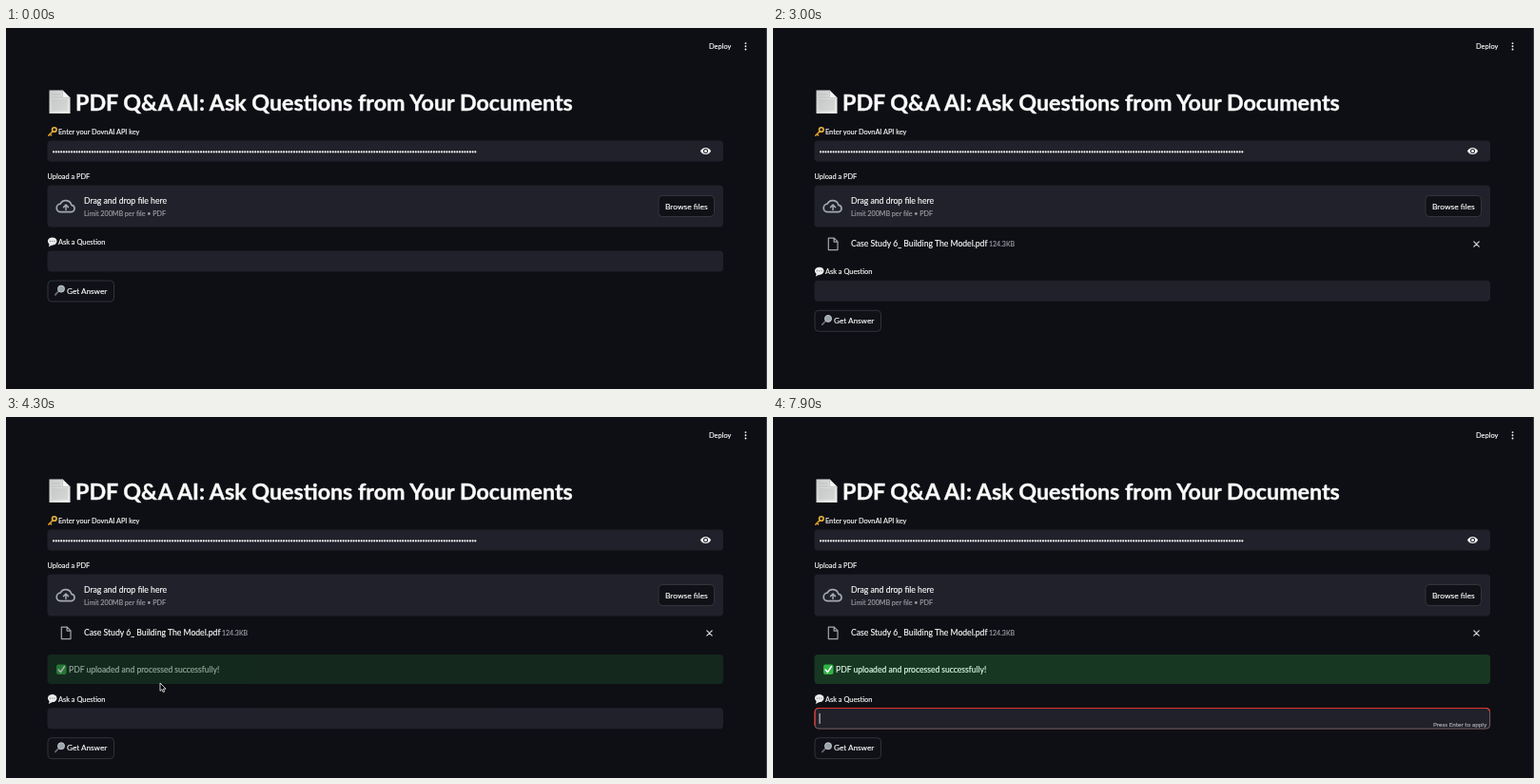
An HTML page that plays this animation: 800x380 px, repeating every 8000 ms.

```html
<!DOCTYPE html>
<html lang="en">
<head>
<meta charset="utf-8">
<title>PDF Q&amp;A</title>
<style>
  html, body { margin: 0; width: 100%; height: 100%; overflow: hidden; background: #0e0f14; }
  svg { display: block; width: 800px; height: 380px; }
  text { white-space: pre; }
  .app { font-family: Lato, "Open Sans", sans-serif; stroke-width: .16px; }
  .mac { font-family: Inter, Roboto, sans-serif; font-weight: 500; }
  .doc { font-family: "Liberation Sans", Arial, sans-serif; }
</style>
</head>
<body>
<svg id="stage" viewBox="0 0 800 380" xmlns="http://www.w3.org/2000/svg"></svg>
<script>
const LOOP = 8000;
const WHITE = '#fafafa', PANEL = '#20212a', BG = '#0e0f14', GREY = '#9a9ca4';
const esc = s => s.replace(/&/g, '&amp;').replace(/</g, '&lt;');

const text = (x, y, s, size, fill, cls, extra = '') =>
  `<text x="${x}" y="${y}" font-size="${size}" fill="${fill}" class="${cls}" ${extra}>${esc(s)}</text>`;
const app = (x, y, s, size, fill = WHITE, extra = '') =>
  text(x, y, s, size, fill, 'app', `stroke="${fill}" ${extra}`);
const mac = (x, y, s, size = 7, fill = '#e8e8e8', extra = '') => text(x, y, s, size, fill, 'mac', extra);
const rect = (x, y, w, h, fill, r = 0, extra = '') =>
  `<rect x="${x}" y="${y}" width="${w}" height="${h}" rx="${r}" fill="${fill}" ${extra}/>`;
const line = (d, stroke, w = 1, extra = '') =>
  `<path d="${d}" fill="none" stroke="${stroke}" stroke-width="${w}" stroke-linecap="round" stroke-linejoin="round" ${extra}/>`;
const shape = (d, fill, extra = '') => `<path d="${d}" fill="${fill}" ${extra}/>`;
const dot = (x, y, r, fill, extra = '') => `<circle cx="${x}" cy="${y}" r="${r}" fill="${fill}" ${extra}/>`;
const group = (id, body, extra = '') => `<g id="${id}" ${extra}>${body}</g>`;

function pageIcon() {
  let rows = '';
  for (let y = 76; y < 88; y += 2) rows += `M48.5 ${y}H64.5`;
  return shape('M45.5 65.5H59.5L67.5 73.5V90H45.5Z', 'url(#paper)') +
    line('M48.5 70H57M48.5 73H58' + rows, '#aeb0b0', .6) +
    shape('M59.5 65.5V73.5H67.5Z', '#f4f4f4', 'stroke="#9b9b9b" stroke-width=".4"');
}

const keyIcon = () =>
  line('M49.3 108.6L44.8 113.1M46.3 111.6L47.6 112.9', '#d99a2b', 1.5) +
  dot(50.8, 107, 2.3, 'none', 'stroke="#e8b23c" stroke-width="1.6"');

const bubbleIcon = () =>
  `<ellipse cx="48.7" cy="224.4" rx="4.8" ry="4" fill="#ececec"/>` +
  shape('M46 226.5L44.8 230.2L49.5 228Z', '#ececec') +
  [46.4, 48.7, 51].map(x => dot(x, 224.4, .6, '#77787c')).join('');

const lensIcon = () =>
  line('M55.2 277.2L51.8 280.8', '#6b6d72', 1.7) +
  dot(58, 274.6, 3.5, '#9aa6ad', 'stroke="#c3c6c9" stroke-width="1"');

const eyeIcon = () =>
  shape('M730 129.5C732 124.7 739 124.7 741 129.5C739 134.3 732 134.3 730 129.5Z', WHITE) +
  dot(735.5, 129.5, 2.5, PANEL) + dot(735.5, 129.5, 1.5, WHITE);

const cloudIcon = () =>
  line('M57.6 193.6A4.2 4.2 0 0 1 57.2 185.2A6.2 6.2 0 0 1 68.8 186.3A3.7 3.7 0 0 1 69 193.6Z', '#a3a8b4', 1.7) +
  line('M63 191.4V186.6M60.5 188.6L63 186.1L65.5 188.6', '#a3a8b4', 1.5);

function page() {
  const header = app(739, 22.1, 'Deploy', 7.45) +
    [16.1, 19.3, 22.5].map(y => dot(777.5, y, .95, WHITE)).join('') +
    pageIcon() +
    app(73, 87, 'PDF Q&A AI: Ask Questions from Your Documents', 23.25, WHITE, 'font-weight="700" style="stroke-width:.4px"');

  const key = keyIcon() + app(55, 111.8, 'Enter your DovnAI API key', 7.3) +
    rect(43.5, 118.5, 710.5, 22, PANEL, 4) +
    line('M50 130.4H495', WHITE, 2.1, 'stroke-dasharray="0 2.72"') + eyeIcon();

  const upload = app(43.5, 159.1, 'Upload a PDF', 7.35) +
    rect(43.5, 165.5, 710.5, 44, PANEL, 4) + cloudIcon() +
    app(82, 184.5, 'Drag and drop file here', 8.65) +
    app(82, 198, 'Limit 200MB per file • PDF', 7.15, GREY) +
    rect(686, 176.5, 58.5, 22, '#101117', 4, 'stroke="#3c3d44" stroke-width=".8"') +
    app(715.3, 190.6, 'Browse files', 8.45, WHITE, 'text-anchor="middle"');

  const file = line('M58.3 221.2H64.3L68 224.9V233.6H58.3Z M64.1 221.4V225.1H67.8', '#a3a5ab', 1.2) +
    app(82, 229.9, 'Case Study 6_ Building The Model.pdf', 8.64) +
    app(227, 229.9, '124.3KB', 7, GREY) +
    line('M736.8 224.8L742.2 230.2M742.2 224.8L736.8 230.2', '#e4e4e6', 1.1);

  const success = rect(43.5, 250, 710.5, 31, '#183722', 4) +
    rect(53, 260.5, 10.5, 10.5, '#2fb344', 2) + line('M55.2 266L57.4 268.6L61.4 262.6', '#fff', 1.6) +
    app(66, 269, 'PDF uploaded and processed successfully!', 8.56, '#dffde9');

  const ask = bubbleIcon() + app(55, 228, 'Ask a Question', 7.4) +
    rect(43.5, 234.5, 710.5, 22, PANEL, 4) +
    group('focus',
      rect(44, 234.8, 709.6, 21.6, 'none', 4, 'stroke="#85676c" stroke-width=".9"') +
      line('M44 252.5V238.8A4 4 0 0 1 48 234.8H749.6A4 4 0 0 1 753.4 237.5', '#e3342f', 1.2)) +
    group('caret', rect(48.6, 240.2, .9, 11, WHITE)) +
    group('hint', app(694, 253.9, 'Press Enter to apply', 6.45, '#a9abb1')) +
    rect(44, 266, 69.5, 22, '#101117', 4, 'stroke="#3c3d44" stroke-width=".8"') +
    lensIcon() + app(64, 279.8, 'Get Answer', 8.2);

  return header + key + upload + group('file', file) + group('success', success) + group('ask', ask);
}

const folder = (x, y) =>
  shape(`M${x} ${y - 3.2}h3l1 1h4v5.6h-8z`, '#3fa9e6') + rect(x, y - 1.2, 8, 4.6, '#5cc0f5', .5);
const chevron = (x, y, c = '#8a8a8d') => line(`M${x} ${y - 1.7}l1.7 1.7l-1.7 1.7`, c, .8);
const sheetIcon = (x, y, c) =>
  shape(`M${x + .8} ${y - 4}h4.2l2 2v6h-6.2z`, c) + line(`M${x + 2.2} ${y}h3.2M${x + 2.2} ${y + 2}h3.2`, '#55585e', .5);

// kind: d = folder, p = selectable document, x = disabled
const FILES = [
  ['d', '__pycache__'], ['x', '1.ipynb'], ['x', 'ai_chatbot.jpg'], ['x', 'answers_hw1.txt'],
  ['x', 'beer_50000.json'], ['x', 'RemZut Web'], ['p', 'Case Study 6…The Model.pdf'],
  ['d', 'Cover Letters'], ['d', 'DSC_206'], ['p', 'dummy_sum…zation_test.pdf'],
  ['x', 'Filtering Asia…May 2024.twb'], ['d', 'Doltun Portfolio']
];

function fileRows() {
  return FILES.map(([kind, name], i) => {
    const y = 241.7 + i * 12.34;
    const icon = kind === 'd' ? folder(265, y) + chevron(381, y)
      : i === 5 ? rect(265.5, y - 3.5, 7, 7, '#68686a', 1)
      : sheetIcon(265, y, kind === 'p' ? '#eeeeee' : '#66666a');
    return icon + mac(276, y + 2.5, name, 7, kind === 'x' ? '#666669' : '#ececec');
  }).join('');
}

function sidebar() {
  const head = (y, s) => mac(184, y + 2.3, s, 6.4, '#77777b', 'font-weight="600"');
  const item = (y, s) => mac(197, y + 2.5, s);
  const tags = [['Red', '#ff5a52'], ['Orange', '#f7a13a'], ['Yellow', '#f8d64a'], ['Green', '#4fd063']];
  return head(210.3, 'Favorites') + head(228.4, 'Vilnod') + head(277.6, 'Locations') + head(311, 'Tags') +
    dot(189, 241.2, 3.6, '#2f7df6') + item(241.2, 'Vilnod Dr…') +
    dot(241, 241, 3.9, 'none', 'stroke="#8a8a8d" stroke-width=".7"') + line('M241 237.3V241', '#8a8a8d', .8) +
    line('M185 255V260.5H193.5V255H188.5L187.5 254H185Z', '#2f7df6', 1) + dot(189.3, 257.7, 1.2, '#2f7df6') +
    item(257, 'Shared') +
    dot(189.3, 290.6, 3.5, 'none', 'stroke="#a8a8ab" stroke-width=".8"') +
    line('M186 290.6H192.6M189.3 287.2C187.2 289 187.2 292.2 189.3 294C191.4 292.2 191.4 289 189.3 287.2', '#a8a8ab', .6) +
    item(290.6, 'Network') +
    tags.map(([s, c], i) => dot(189.2, 324.2 + i * 15.65, 2.9, c) + item(324.2 + i * 15.65, s)).join('');
}

function toolbar() {
  const down = x => line(`M${x} 213.8l1.8 1.8l1.8 -1.8`, '#c9c9cb', .9);
  let grid = '';
  for (let i = 0; i < 9; i++) grid += rect(333.3 + i % 3 * 2.8, 210.7 + Math.floor(i / 3) * 2.8, 2, 2, '#c9c9cb');
  return rect(267, 209, 12.4, 11.5, '#414144', 2.5) + rect(280.4, 209, 12.4, 11.5, '#414144', 2.5) +
    line('M274 212.6l-2 2.1l2 2.1M285.6 212.6l2 2.1l-2 2.1', '#77777a', .9) +
    rect(298, 209, 26, 11.5, '#48484b', 2.5) +
    line('M303 211.2H311V218.2H303ZM305.7 211.2V218.2M308.4 211.2V218.2', '#d0d0d2', .8) + down(316.5) +
    rect(328, 209, 26, 11.5, '#48484b', 2.5) + grid + down(346.5) +
    rect(381.5, 209, 116, 11.5, '#505053', 2.5) + folder(386, 214.7) + mac(397, 217.3, 'Desktop') +
    rect(487.3, 210, 9, 9.5, '#1765dc', 2) +
    line('M490.2 213.5l1.6 -1.7l1.6 1.7M490.2 216l1.6 1.7l1.6 -1.7', '#fff', .8) +
    rect(525, 209, 86, 11.5, '#29292b', 2.5, 'stroke="#47474a" stroke-width=".6"') +
    dot(531.7, 214.1, 2.2, 'none', 'stroke="#c0c0c2" stroke-width=".8"') + line('M533.4 215.8l1.9 1.9', '#c0c0c2', .8) +
    mac(540, 217.3, 'Search', 7, '#86868a');
}

function preview() {
  const words = 'the model is built from the data and each step of the study is described in order with a short note on the method used to test it ';
  const flow = words.repeat(3);
  const tiny = (x, y, s, bold) => text(x, y, s, 2.25, '#333', 'doc', bold ? 'font-weight="700"' : '');
  const block = (x, y, rows, chars, seed, lastLen = .6) => {
    let out = '';
    for (let i = 0; i < rows; i++) {
      const from = (seed * 37 + i * 53) % words.length;
      out += tiny(x, y + i * 2.75, flow.substr(from, i === rows - 1 ? chars * lastLen : chars).trim());
    }
    return out;
  };
  let bullets = '';
  for (let i = 0; i < 4; i++) {
    const y = 272 + i * 5.3;
    bullets += dot(477.6, y - .8, .5, '#222') + tiny(479.5, y, 'Model Building Step:', true) +
      tiny(503, y, flow.substr(i * 19, 38)) + tiny(479.5, y + 2.6, flow.substr(i * 23, 48));
  }
  return rect(463, 238, 89, 115, '#fff', 2) +
    tiny(501, 249.5, 'Case Study 6', true) + tiny(470, 252.4, 'Section 1: Summary', true) +
    block(470, 255.6, 4, 69, 1) + block(470, 267.6, 1, 69, 2, .75) + bullets +
    block(470, 296, 8, 69, 3) + block(470, 320.5, 5, 69, 4) + block(470, 337, 5, 69, 5) +
    mac(398, 376.6, 'Case Study 6_ Building The Model.pdf', 8.2, '#ededed', 'font-weight="600"');
}

function dialog() {
  return rect(175.5, 198, 447, 200, '#1d1d1f', 5) +
    shape('M256 198H180.5A5 5 0 0 0 175.5 203V380H256Z', '#27272a') +
    rect(256, 233, 366, 150, '#1a1a1c') +
    line('M256 232.6H622M392.5 233V380M256 198V380', '#353538', .7) +
    sidebar() + toolbar() +
    group('pick', rect(261, 309.6, 126, 12.4, '#0c57d2', 2.5)) + fileRows() +
    group('preview', preview()) +
    rect(175.5, 198, 447, 200, 'none', 5, 'stroke="#525255" stroke-width=".8"');
}

const ibeam = 'M-1.8 -4.2Q0 -4.2 0 -3Q0 -4.2 1.8 -4.2M0 -3V3M-1.8 4.2Q0 4.2 0 3Q0 4.2 1.8 4.2M-1 0H1';

const stage = document.getElementById('stage');
stage.innerHTML =
  `<defs><linearGradient id="paper" x1="0" y1="0" x2="1" y2="1">
    <stop offset="0" stop-color="#c9cccc"/><stop offset="1" stop-color="#ececea"/></linearGradient></defs>` +
  rect(0, 0, 800, 380, BG) + page() + rect(799, 0, 1, 380, '#3b3c42') +
  group('dim', rect(0, 0, 800, 380, '#0e0e0f')) + group('dialog', dialog()) +
  group('arrow', shape('M0 0V8.4L1.9 6.7L3.2 9.6L4.6 9L3.3 6.2H6Z', '#000', 'stroke="#fff" stroke-width=".8"')) +
  group('beam', line(ibeam, '#111', 2) + line(ibeam, '#e6e6e6', .9));

const el = {};
stage.querySelectorAll('g[id]').forEach(g => el[g.id] = g);

const PATH = [
  [700, 345, 390], [900, 330, 363], [1400, 322.5, 356], [1700, 322, 326], [1800, 321, 317],
  [2000, 321, 317], [2250, 560, 392], [3250, 320, 392], [3600, 230, 340], [4300, 162, 280],
  [4600, 160, 283], [5200, 103.5, 317.3], [8000, 103.5, 317.3]
];

const ramp = (t, a, b) => Math.min(1, Math.max(0, (t - a) / (b - a)));
const ease = u => u * u * (3 - 2 * u);

function pointer(t) {
  const i = PATH.findIndex(p => p[0] > t);
  if (i < 1) return [-50, -50];
  const [t0, x0, y0] = PATH[i - 1], [t1, x1, y1] = PATH[i];
  const u = ease(ramp(t, t0, t1));
  return [x0 + (x1 - x0) * u, y0 + (y1 - y0) * u];
}

const fade = (g, a) => {
  g.setAttribute('opacity', a);
  g.setAttribute('visibility', a > 0 ? 'visible' : 'hidden');
};

function draw(t) {
  const UPLOADED = 3000, DONE = 4100, KEY = 5700;
  fade(el.dim, .45 * (ramp(t, 100, 400) - ramp(t, 2700, 2950)));
  fade(el.dialog, ramp(t, 250, 500) - ramp(t, 2700, 2850));
  fade(el.pick, t >= 1800 && t < 2850 ? 1 : 0);
  fade(el.preview, t >= 2000 && t < 2700 ? 1 : 0);
  fade(el.file, t >= UPLOADED ? 1 : 0);
  fade(el.success, t < DONE ? 0 : .3 + .7 * ramp(t, DONE, 4500));
  el.ask.setAttribute('transform', `translate(0 ${t < UPLOADED ? 0 : t < DONE ? 31.3 : 71.7})`);
  fade(el.focus, ramp(t, 5300, 5500));
  fade(el.hint, t >= KEY ? 1 : 0);
  fade(el.caret, t >= KEY && (t - KEY) % 1000 < 500 ? 1 : 0);

  const [x, y] = pointer(t);
  const overInput = t > DONE && y > 306;
  const at = `translate(${x.toFixed(2)} ${y.toFixed(2)})`;
  el.arrow.setAttribute('transform', at);
  el.beam.setAttribute('transform', at);
  fade(el.arrow, overInput ? 0 : 1);
  fade(el.beam, overInput && t < KEY ? 1 : 0);
}

const start = performance.now();
function tick() {
  draw((performance.now() - start) % LOOP);
  requestAnimationFrame(tick);
}
draw(0);
requestAnimationFrame(tick);
</script>
</body>
</html>
```
